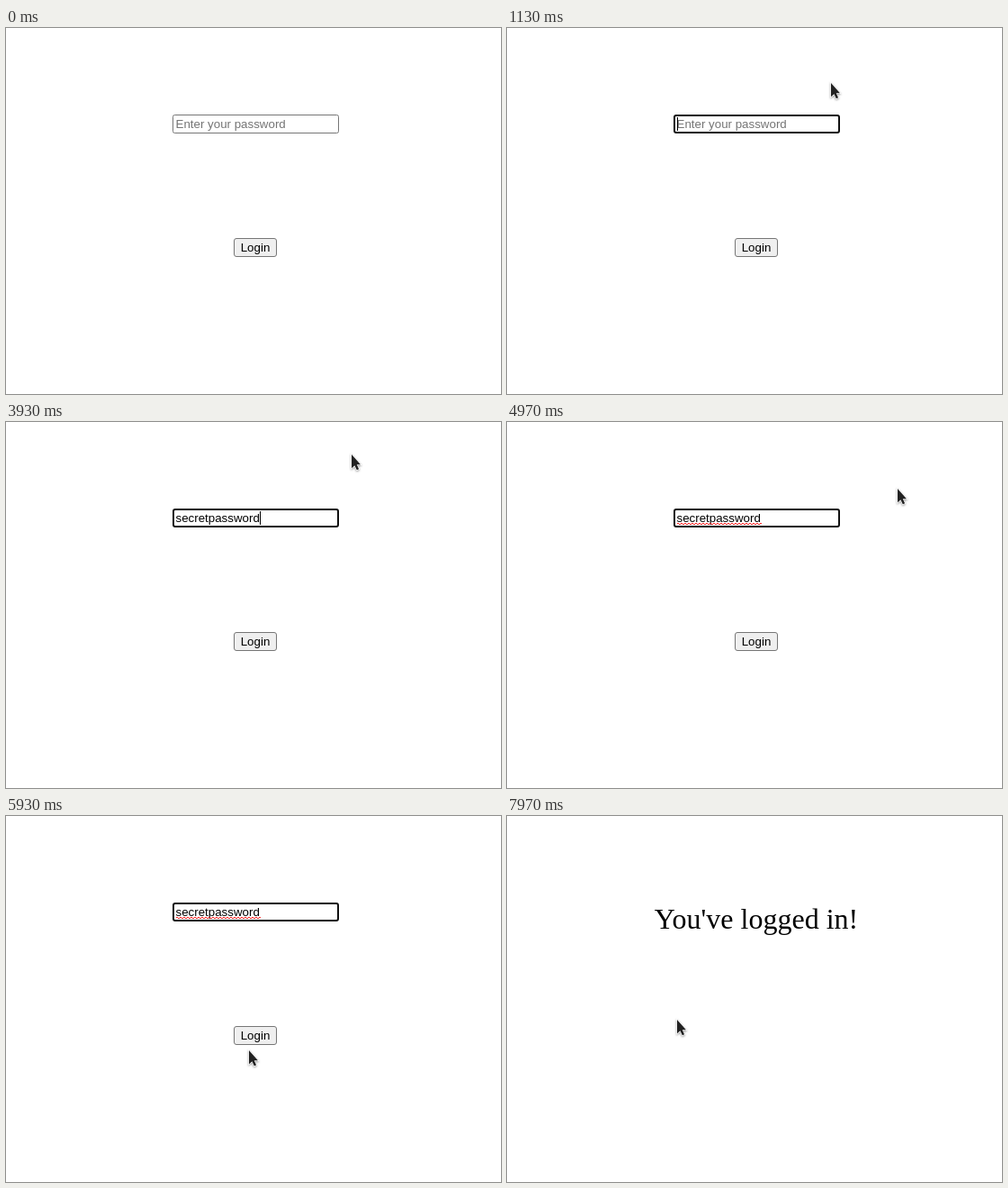
An HTML page for the animation above (8 s loop, 550 px wide and 406 px high).

```html
<!DOCTYPE html>
<html lang="en">
<head>
<meta charset="utf-8">
<title>Login</title>
<style>
  html, body { margin: 0; width: 100%; height: 100%; overflow: hidden; background: #fff; }
  body { position: relative; font: 13.3333px/15px "Liberation Sans", Arial, sans-serif; color: #000; }
  body div, svg { position: absolute; white-space: pre; }
  #field, #button { box-sizing: border-box; border: 1px solid #767676; }
  #field { left: 185px; top: 96px; width: 185px; height: 21px; border-radius: 2.5px; }
  #button { left: 253px; top: 233px; width: 48px; height: 21px; border-radius: 3px; background: #efefef; }
  #field.hover, #button.hover { border-color: #4f4f4f; }
  #button.hover { background: #e5e5e5; }
  #button.pressed { border-color: #8d8d8d; background: #f5f5f5; }
  #field.focused { border: 2px solid #101010; border-radius: 3px; }
  #typed, #placeholder { left: 188.5px; top: 99px; }
  #placeholder { color: #757575; }
  #label { left: 260.7px; top: 236px; }
  #caret { top: 99px; width: 1px; height: 15px; background: #000; }
  #title { left: 163.7px; top: 96px; font: 32px/37px "Liberation Serif", "Times New Roman", serif; }
  svg { left: 0; top: 0; }
  #arrow { filter: drop-shadow(0.5px 1px 0.8px rgba(0, 0, 0, .4)); }
</style>
</head>
<body>
<div id="form">
  <div id="field"></div>
  <div id="placeholder">Enter your password</div>
  <div id="typed"></div>
  <div id="caret"></div>
  <div id="button"></div>
  <div id="label">Login</div>
</div>
<div id="title">You've logged in!</div>
<svg width="550" height="406">
  <path id="squiggle" fill="none" stroke="#f00" stroke-width="0.9"/>
  <g id="pointer">
    <path id="arrow" d="M0 0V15.2L3.4 12.2 5.8 17.3 8.1 16.2 5.8 11.3H10Z"
      fill="#222" stroke="#fff" stroke-width="1.4" paint-order="stroke"/>
    <g id="beam" fill="none">
      <path d="M-3 -8H3M0 -8V8M-3 8H3" stroke="#fff" stroke-width="3"/>
      <path d="M-3 -8H3M0 -8V8M-3 8H3" stroke="#222"/>
    </g>
  </g>
</svg>
<script>
const LOOP = 8000, FRAME = 100 / 3;
const APPEAR = 300, FOCUS = 970, SPELLCHECK = 4870, PRESS = 6930, RELEASE = 7000, LOGGED_IN = 7070;
const PASSWORD = 'secretpassword';
const KEY_TIMES = [1800, 1970, 2130, 2370, 2500, 2600, 2870, 3030, 3130, 3270, 3500, 3700, 3770, 3930];

// Pointer path: time, x, y
const PATH = [
  [300, 377, 4], [500, 368, 50], [730, 340, 105], [1000, 340, 105],
  [1130, 360, 61], [1400, 384, 36], [4840, 384, 36], [5170, 531, 200],
  [5370, 486, 343], [5470, 430, 359], [5670, 288, 315], [5930, 270, 260],
  [6070, 270, 252], [6200, 270, 252], [6500, 272, 244], [7770, 272, 244], [7970, 189, 226]
];

const $ = id => document.getElementById(id);
const show = (id, on) => { $(id).style.display = on ? '' : 'none'; };
const inside = (x, y, left, top, right, bottom) => x >= left && x < right && y >= top && y < bottom;

$('squiggle').setAttribute('d', 'M189 113q1 -1.7 2 0' + 't2 0'.repeat(46));

// Tangent that vanishes at rests and turning points, so the path never overshoots.
function slope(i, axis) {
  const a = PATH[Math.max(i - 1, 0)], b = PATH[i], c = PATH[Math.min(i + 1, PATH.length - 1)];
  const turning = a !== b && b !== c && (b[axis] - a[axis]) * (c[axis] - b[axis]) <= 0;
  return turning ? 0 : (c[axis] - a[axis]) / (c[0] - a[0]);
}

function pointerAt(time) {
  const next = PATH.findIndex(p => p[0] > time);
  if (next < 0) return PATH[PATH.length - 1].slice(1);
  const i = Math.max(next - 1, 0), a = PATH[i], b = PATH[i + 1];
  const span = b[0] - a[0], u = Math.max(0, (time - a[0]) / span), v = 1 - u;
  return [1, 2].map(axis =>
    a[axis] * v * v * (1 + 2 * u) + b[axis] * u * u * (3 - 2 * u) +
    span * u * v * (v * slope(i, axis) - u * slope(i + 1, axis)));
}

function caretVisible(idle) {
  return idle < 600 || Math.floor((idle - 600) / 490) % 2 === 1;
}

function draw(time) {
  const count = KEY_TIMES.filter(k => k <= time).length;
  const focused = time >= FOCUS && time < PRESS;
  const loggedIn = time >= LOGGED_IN;
  const [x, y] = pointerAt(time).map(Math.round);
  const overField = !loggedIn && inside(x, y, 185, 96, 370, 117);

  show('form', !loggedIn);
  show('title', loggedIn);
  show('placeholder', count === 0);
  show('squiggle', time >= SPELLCHECK && !loggedIn);
  show('pointer', time >= APPEAR);
  show('arrow', !overField);
  show('beam', overField);

  $('typed').textContent = PASSWORD.slice(0, count);
  show('caret', focused && caretVisible(time - (count ? KEY_TIMES[count - 1] : FOCUS)));
  $('caret').style.left = Math.round(188.5 + $('typed').getBoundingClientRect().width) + 'px';

  $('field').className = focused ? 'focused' : overField && time >= APPEAR ? 'hover' : '';
  $('button').className = time >= PRESS && time < RELEASE ? 'pressed'
    : inside(x, y, 253, 233, 301, 254) ? 'hover' : '';
  $('pointer').setAttribute('transform', `translate(${x} ${y})`);
}

const start = performance.now();
function tick() {
  const elapsed = Math.max(0, performance.now() - start) % LOOP;
  const frame = Math.floor((elapsed + 4) / FRAME);
  draw(Math.round(frame * FRAME / 10) * 10 % LOOP);
  requestAnimationFrame(tick);
}
tick();
</script>
</body>
</html>
```
